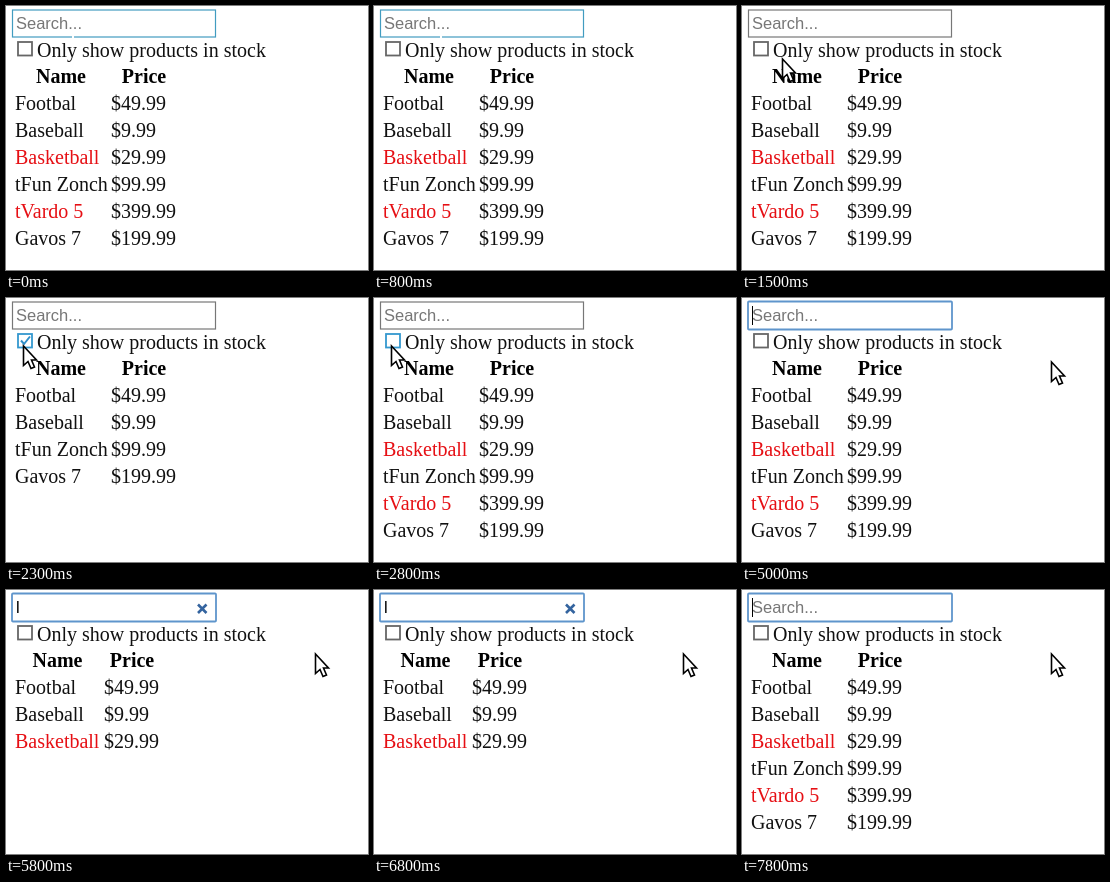
Recreate the animation shown at these times as an HTML page. Size 362 px wide and 264 px high, loop 8 s.

```html
<!DOCTYPE html>
<html lang="en">
<head>
<meta charset="utf-8">
<title>Searchable product table</title>
<style>
  html, body { margin: 0; width: 100%; height: 100%; overflow: hidden; background: #fff; }
  svg { display: block; }
  text { font: 20px "Liberation Serif", "Times New Roman", serif; fill: #111; }
  .head text { font-weight: bold; text-anchor: middle; fill: #000; }
  .search { font: 16.5px "Liberation Sans", Arial, sans-serif; fill: #777; }
  .typed { fill: #000; }
  .out { fill: #e60f14; }
</style>
</head>
<body>
<svg width="362" height="264" viewBox="0 0 362 264">
  <rect id="field" fill="#fff"/>
  <text id="query" x="10" y="23"></text>
  <path id="clear" d="M192 14.5l8.5 8.5m0-8.5l-8.5 8.5" stroke="#34649f" stroke-width="2.6"/>
  <path id="caret" d="M10.5 8v19" stroke="#000"/>
  <rect id="box" x="12" y="36" width="14" height="13.5" fill="#fff" stroke-width="1.8"/>
  <path id="tick" d="M15 42.5l3 3.5l6-7.5" fill="none" stroke="#2f8fca" stroke-width="2"/>
  <text x="31" y="51">Only show products in stock</text>
  <g class="head">
    <text id="nameHead" y="77">Name</text>
    <text id="priceHead" y="77">Price</text>
  </g>
  <g id="rows"></g>
  <path id="beam" d="M-3 0h6M0 0v19M-3 19h6" fill="none" stroke="#fff" stroke-width="2"/>
  <path id="arrow" d="M.5 1V20.5L5 16.5L8 23.5L11.5 22L8.5 15H13.5Z" fill="#fff" stroke="#000" stroke-width="1.6"/>
</svg>
<script>
const LOOP = 8000;
const $ = id => document.getElementById(id);

const products = [
  ["Footbal", "$49.99", true],
  ["Baseball", "$9.99", true],
  ["Basketball", "$29.99", false],
  ["tFun Zonch", "$99.99", true],
  ["tVardo 5", "$399.99", false],
  ["Gavos 7", "$199.99", true]
];

// Each step changes part of the state at the given time.
const steps = [
  [0, { field: "hover", beam: [67, 14], arrow: null, checked: false, boxHover: false, query: "", caret: false }],
  [1300, { field: "idle", beam: null, arrow: [40, 52] }],
  [1800, { arrow: [48, 58] }],
  [2000, { arrow: [17, 47], boxHover: true }],
  [2300, { checked: true }],
  [2800, { checked: false }],
  [3000, { field: "hover", beam: [48, 11], arrow: null, boxHover: false }],
  [3300, { field: "focus", caret: true }],
  [3800, { beam: null, arrow: [60, 32] }],
  [4000, { arrow: [309, 63] }],
  [4800, { caret: false }],
  [5000, { caret: true }],
  [5300, { query: "l", caret: false }],
  [7000, { query: "" }],
  [7300, { caret: true }]
];

const thin = { x: 6.5, y: 4, width: 203, height: 27, rx: 0, "stroke-width": 1.2 };
const fieldStyles = {
  idle: { ...thin, stroke: "#777" },
  hover: { ...thin, stroke: "#419cc0" },
  focus: { x: 6, y: 3.5, width: 204, height: 28, rx: 1, stroke: "#5f95cc", "stroke-width": 1.8 }
};

function set(el, attrs) {
  for (const key in attrs) el.setAttribute(key, attrs[key]);
}
function show(id, on) {
  $(id).style.display = on ? "" : "none";
}
function place(id, point) {
  show(id, point);
  if (point) set($(id), { transform: `translate(${point})` });
}

function render(s) {
  set($("field"), fieldStyles[s.field]);
  $("query").textContent = s.query || "Search...";
  set($("query"), { class: s.query ? "search typed" : "search" });
  show("clear", s.query);
  show("caret", s.caret);
  set($("box"), { stroke: s.boxHover ? "#3498cf" : "#666" });
  show("tick", s.checked);

  const wide = !s.query;
  set($("nameHead"), { x: wide ? 55 : 51.5 });
  set($("priceHead"), { x: wide ? 138 : 126 });
  $("rows").innerHTML = products
    .filter(([name, , stocked]) => name.includes(s.query) && (stocked || !s.checked))
    .map(([name, price, stocked], i) => {
      const y = 104 + 27 * i;
      return `<text x="9" y="${y}" class="${stocked ? "" : "out"}">${name}</text>` +
        `<text x="${wide ? 105 : 98}" y="${y}">${price}</text>`;
    }).join("");

  place("beam", s.beam);
  place("arrow", s.arrow);
}

let shown = -1;
function tick() {
  const time = performance.now() % LOOP;
  const active = steps.filter(([start]) => start <= time);
  if (active.length !== shown) {
    shown = active.length;
    render(Object.assign({}, ...active.map(step => step[1])));
  }
  requestAnimationFrame(tick);
}
tick();
</script>
</body>
</html>
```
